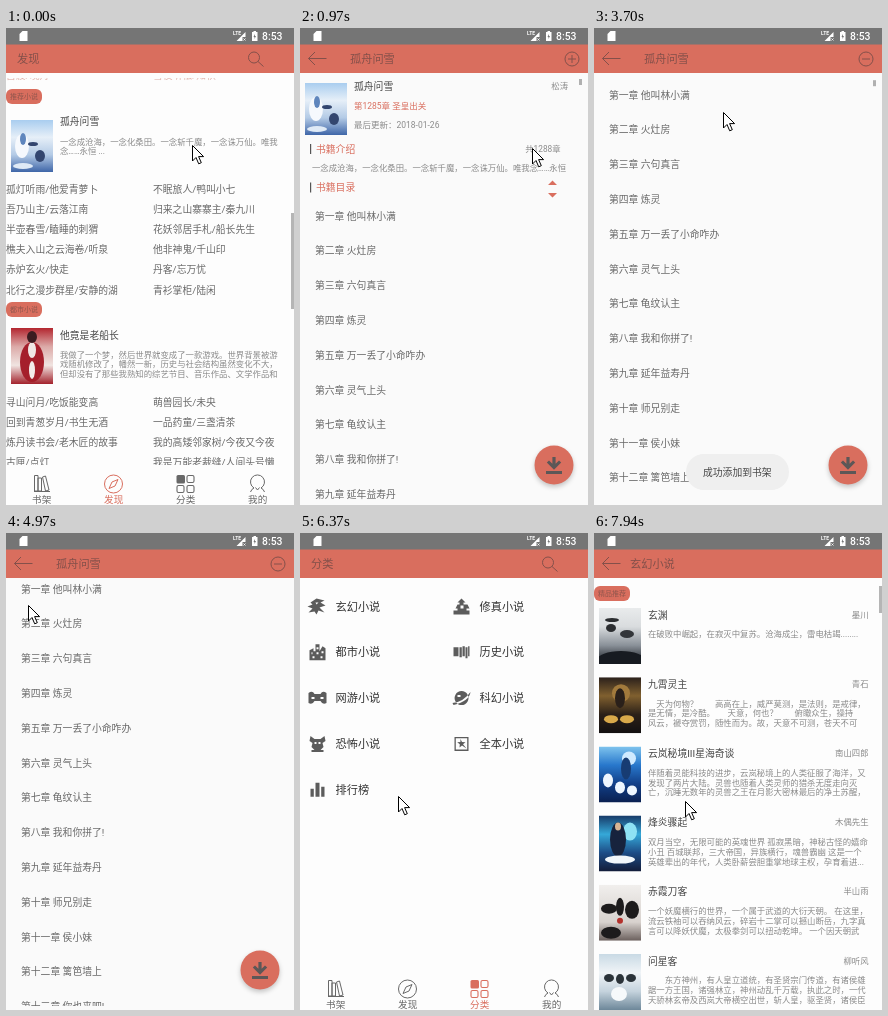
An HTML page with a canvas that plays this animation: 288x477 px, repeating every 8 s.

```html
<!DOCTYPE html>
<html lang="zh-CN">
<head>
<meta charset="utf-8">
<title>小说阅读器</title>
<style>
html, body { margin: 0; width: 100%; height: 100%; overflow: hidden; background: #fdfdfd; }
canvas { display: block; width: 288px; height: 477px; }
</style>
</head>
<body>
<canvas id="stage" width="288" height="477"></canvas>
<script>
const W = 288, H = 477, LOOP = 8000;
const RED = '#d96e5e', INK = '#686868', DARK = '#454545', PALE = '#8a8a8a', HEAD = '#84504a';
const FONT = 'Roboto, "Noto Sans CJK SC", "Noto Sans CJK", sans-serif';
const screen = document.getElementById('stage').getContext('2d');
const buffer = document.createElement('canvas');
buffer.width = W;
buffer.height = H;
const layerCtx = buffer.getContext('2d');
let g = screen;

const ticks = [
  [0, 0, 0], [430, 970, 4], [970, 1380, 3], [1500, 1500, 0], [1770, 2160, 3], [2160, 2590, 3],
  [3150, 3700, 4], [3700, 4150, 3], [4270, 4970, 5], [4970, 5240, 2], [5370, 5790, 3],
  [6220, 6370, 1], [6370, 6880, 4], [7160, 7310, 1], [7580, 7940, 3]
].flatMap(([a, b, n]) => Array.from({ length: n + 1 }, (_, i) => Math.floor(a + (n && (b - a) * i / n))));

const cursorPath = [
  [0, 186, 117], [700, 186, 117], [835, 207, 120], [970, 232, 120], [1107, 256, 85],
  [1243, 269, 42], [1380, 271, 27], [1500, 271, 25], [1770, 271, 25], [1900, 200, 36],
  [2160, 38, 66], [2303, 21, 95], [2590, 120, 230], [3150, 120, 230], [3562, 128, 105],
  [3700, 129, 84], [3850, 66, 44], [4150, 16, 26], [4690, 15, 26], [4970, 22, 72],
  [5240, 63, 319], [5510, 130, 415], [5790, 181, 455], [6220, 181, 455], [6370, 98, 263],
  [6625, 52, 110], [6880, 42, 74], [7580, 42, 74], [7940, 91, 268]
];
const scrollPath = [[3150, 0], [3425, 62], [3700, 121], [4150, 132]];

const clamp = v => Math.max(0, Math.min(1, v));
const between = (t, a, b) => t >= a && t < b;

function along(path, t) {
  const i = path.findIndex(k => k[0] > t);
  if (i === 0) return path[0].slice(1);
  if (i < 0) return path[path.length - 1].slice(1);
  const a = path[i - 1], b = path[i], p = (t - a[0]) / (b[0] - a[0]);
  return a.slice(1).map((v, n) => v + (b[n + 1] - v) * p);
}

function text(str, x, y, size = 9.8, color = INK, align = 'left', weight = 400) {
  g.font = `${weight} ${size}px ${FONT}`;
  g.fillStyle = color;
  g.textAlign = align;
  g.fillText(str, x, y + size * 0.37);
}
function rect(x, y, w, h, color, r = 0) {
  g.fillStyle = color;
  g.beginPath();
  g.roundRect(x, y, w, h, r);
  g.fill();
}
function disc(x, y, rx, ry, color) {
  g.fillStyle = color;
  g.beginPath();
  g.ellipse(x, y, rx, ry, 0, 0, 7);
  g.fill();
}
function shape(d, x, y, color, line = 0) {
  const path = new Path2D(d);
  g.save();
  g.translate(x, y);
  if (line) {
    g.strokeStyle = color;
    g.lineWidth = line;
    g.stroke(path);
  } else {
    g.fillStyle = color;
    g.fill(path, 'evenodd');
  }
  g.restore();
}
function clipped(y, h, draw) {
  g.save();
  g.beginPath();
  g.rect(0, y, W, h);
  g.clip();
  draw();
  g.restore();
}

// Covers: gradient colours, then soft blots [colour, x, y, rx, ry]
const covers = {
  sky: [['#a9cdef', '#e6eff8', '#b4cbe6', '#3f66a8'],
    ['#f6f9fd', 11, 26, 7, 12], ['#5f86bd', 12, 19, 3, 6], ['#33466f', 22, 24, 5, 2], ['#33466f', 29, 36, 5, 6], ['#dfeaf6', 12, 46, 10, 3]],
  coat: [['#b3262f', '#dcaaa8', '#f0e4e1', '#a3222c'],
    ['#a51f2b', 21, 34, 12, 20], ['#f0e7e4', 21, 22, 4, 8], ['#3b1c20', 21, 9, 5, 6], ['#f3ecea', 21, 42, 3, 9]],
  ink: [['#e9ebec', '#d9dcde', '#8a9199', '#12161c'],
    ['#2b2d30', 13, 12, 7, 2], ['#2b2d30', 12, 20, 5, 4], ['#33363a', 28, 26, 7, 4], ['#171b21', 22, 52, 24, 9]],
  gold: [['#2a201b', '#80602f', '#2b2018', '#121011'],
    ['#a27a3c', 22, 16, 9, 9], ['#2a201a', 21, 21, 5, 10], ['#d8a94a', 12, 42, 7, 4], ['#d8a94a', 28, 42, 7, 4]],
  blue: [['#7fc4ee', '#2878cc', '#123f88', '#0a2050'],
    ['#cfeaff', 30, 12, 7, 7], ['#173c73', 27, 22, 5, 11], ['#eef6ff', 9, 34, 5, 7], ['#eef6ff', 21, 41, 5, 6], ['#eef6ff', 33, 44, 5, 5]],
  cyan: [['#173a68', '#35a8d8', '#1d4c86', '#131c38'],
    ['#8ee2f4', 31, 16, 7, 9], ['#17233d', 19, 24, 8, 17], ['#d8b594', 19, 11, 3, 4], ['#f2f7fb', 21, 44, 15, 4]],
  brush: [['#f1efed', '#e4e0dd', '#d8d2ce', '#6a5f5c'],
    ['#1d1b1c', 10, 24, 8, 5], ['#1d1b1c', 21, 22, 4, 9], ['#1d1b1c', 33, 25, 7, 9], ['#1d1b1c', 12, 48, 10, 6], ['#b4312c', 21, 36, 3, 3]],
  mist: [['#c9dae5', '#f0f4f7', '#c5d3dd', '#6d8799'],
    ['#2b3339', 10, 24, 5, 4], ['#2b3339', 21, 25, 4, 5], ['#2b3339', 32, 24, 5, 4], ['#f6f9fb', 20, 40, 8, 7]]
};
function cover(name, y, h = 56) {
  const [tones, ...blots] = covers[name];
  const fill = g.createLinearGradient(0, 0, 0, h);
  tones.forEach((c, i) => fill.addColorStop(i / 3, c));
  g.save();
  g.translate(5, y);
  g.beginPath();
  g.rect(0, 0, 42, h);
  g.clip();
  rect(0, 0, 42, h, fill);
  blots.forEach(([c, x, by, rx, ry]) => disc(x, by, rx, ry, c));
  g.restore();
}

function bar(title, x) {
  rect(0, 16, W, 29, RED);
  text(title, x, 30.5, 11.2, HEAD);
}
function backArrow() {
  shape('M18.5 0H.5L7-6.5M.5 0L7 6.5', 8, 30.5, HEAD, 1);
}
function search() {
  shape('M5.5 0A5.5 5.5 0 1 1-5.5 0A5.5 5.5 0 1 1 5.5 0M4 4L9.5 9', 248, 29.5, HEAD, 1);
}
function tag(str, y) {
  rect(0, y, 36, 15, RED, 6);
  text(str, 4, y + 7.5, 7, '#8f554c');
}
function blurb(lines, y) {
  lines.forEach((s, i) => text(s, 54, y + i * 9.8, 8.4, PALE));
}

function statusBar() {
  rect(0, 0, W, 16.4, '#757575');
  shape('M3 0H8V10H0V3z', 13.5, 3, '#fff');
  text('LTE', 227, 5.5, 5, '#fff', 'left', 700);
  shape('M9 0V5H6V9H0zM7 6L9 9M9 6L7 9', 230.5, 4, '#fff');
  shape('M7 6.5L9 8.5M9 6.5L7 8.5', 230.5, 4, '#fff', 0.8);
  shape('M1.5 0H4V1H5.5V10H0V1H1.5zM3 3L1.5 6H2.5V8L4 5H3z', 246, 3, '#fff');
  text('8:53', 256, 8.2, 10.4, '#fff', 'left', 500);
}

function tabs(active) {
  const tone = i => i === active ? RED : INK;
  rect(0, 437, W, 40, '#fdfdfd');
  shape('M.5 .5H4V16H.5zM4 3H7.5V16H4zM8.5 2L11.5 1L15 15L11.5 16zM0 16.5H16', 28, 447, tone(0), 1);
  shape('M9 0A9 9 0 1 1-9 0A9 9 0 1 1 9 0M4.5-4.5L1.5 2L-4.5 4.5L-1.5-2z', 107.5, 456, tone(1), 1);
  rect(170.5, 447, 8.5, 8.5, tone(2), 1.5);
  g.strokeStyle = tone(2);
  g.lineWidth = 1.1;
  [[181, 447.5], [171, 457.5], [181, 457.5]].forEach(([x, y]) => {
    g.beginPath();
    g.roundRect(x, y, 7, 7, 1.5);
    g.stroke();
  });
  shape('M-3.5 6A7 7 0 1 1 3.5 6M-7 10Q-6 7-3.5 6M7 10Q6 7 3.5 6M-2 5.5L0 8L2 5.5', 251.5, 454, tone(3), 1);
  ['书架', '发现', '分类', '我的'].forEach((s, i) => text(s, 35.7 + i * 72, 471, 9.6, tone(i), 'center'));
}

const picks = [
  ['孤灯听雨/他爱青萝卜', '不眠旅人/鸭叫小七'],
  ['吾乃山主/云落江南', '归来之山寨寨主/秦九川'],
  ['半壶春雪/瞌睡的刺猬', '花妖邻居手札/船长先生'],
  ['樵夫入山之云海卷/听泉', '他非神鬼/千山印'],
  ['赤炉玄火/快走', '丹客/忘万忧'],
  ['北行之漫步群星/安静的湖', '青衫掌柜/陆闲']
];
const cityPicks = [
  ['寻山问月/吃饭能变高', '萌兽园长/未央'],
  ['回到青葱岁月/书生无酒', '一品药童/三盏清茶'],
  ['炼丹读书会/老木匠的故事', '我的高矮邻家树/今夜又今夜'],
  ['古匣/点灯', '我是万能老裁缝/人间头号懒']
];
const BOOK = '孤舟问雪';

function pairs(rows, y) {
  rows.forEach((row, i) => row.forEach((s, n) => text(s, n * 147, y + i * 20.2)));
}
function discover(t) {
  rect(0, 0, W, H, '#fdfdfd');
  clipped(50, 387, () => {
    text('古渡/晚舟', 0, 47.5, 9.8, '#e0b5ae');
    text('雪夜听松/知秋', 147, 47.5, 9.8, '#e0b5ae');
    tag('推荐小说', 61);
    g.globalAlpha = between(t, 430, 900) ? 0.4 : 1;
    cover('sky', 92, 52);
    text(BOOK, 54, 93.7, 9.8, DARK);
    blurb(['一念成沧海，一念化桑田。一念斩千魔，一念诛万仙。唯我', '念……永恒 ...'], 113.5);
    g.globalAlpha = 1;
    pairs(picks, 161);
    tag('都市小说', 274);
    cover('coat', 300);
    text('他竟是老船长', 54, 307, 9.8, DARK);
    blurb(['我做了一个梦，然后世界就变成了一款游戏。世界背景被游', '戏随机修改了，幡然一新，历史与社会结构虽然变化不大，', '但却没有了那些我熟知的综艺节目、音乐作品、文学作品和'], 326.5);
    pairs(cityPicks, 374);
    if (t < 900) rect(285, 185, 3, 96, '#b5b5b5');
  });
  bar('发现', 11);
  search();
  tabs(1);
}

const chapters = ['一章 他叫林小满', '二章 火灶房', '三章 六句真言', '四章 炼灵', '五章 万一丢了小命咋办',
  '六章 灵气上头', '七章 龟纹认主', '八章 我和你拼了!', '九章 延年益寿丹', '十章 师兄别走',
  '十一章 侯小妹', '十二章 篱笆墙上', '十三章 你也来吧!'];

function detail(t) {
  const [scroll] = along(scrollPath, t);
  rect(0, 0, W, H, '#fafafa');
  clipped(50, 423, () => {
    g.translate(0, -scroll);
    cover('sky', 55, 52);
    text(BOOK, 54, 58, 9.8, DARK);
    text('松涛', 268, 57.5, 8.4, PALE, 'right');
    text('第1285章 圣皇出关', 54, 77.5, 8.5, RED);
    text('最后更新：2018-01-26', 54, 96.5, 8.5, PALE);
    [['书籍介绍', 121], ['书籍目录', 159.5]].forEach(([s, y]) => {
      rect(10, y - 5, 1.2, 10, '#555');
      text(s, 16, y, 9.8, RED);
    });
    text('共1288章', 260.5, 120.5, 8.3, PALE, 'right');
    text('一念成沧海，一念化桑田。一念斩千魔，一念诛万仙。唯我念……永恒', 12, 139.5, 8.4, PALE);
    shape('M-4.5 0L0-4.5L4.5 0zM-4.5 8H4.5L0 12.5z', 252.5, 157, RED);
    chapters.forEach((s, i) => text('第' + s, 15, 188 + i * 34.8));
  });
  if (t < 4600) rect(279, 51 + scroll / 100, 3, 6, '#b0b0b0');
  bar(BOOK, 50);
  backArrow();
  const plus = t < 1770 ? 'M0-4V4' : '';
  shape('M7 0A7 7 0 1 1-7 0A7 7 0 1 1 7 0M-4 0H4' + plus, 272, 31, HEAD, 1);
  g.save();
  g.shadowColor = 'rgba(0,0,0,.22)';
  g.shadowBlur = 5;
  g.shadowOffsetY = 2.5;
  disc(254, 437, 19.5, 19.5, RED);
  g.restore();
  shape('M-1.6-8H1.6V-1.2L5-4.6L7.2-2.4L0 4.8L-7.2-2.4L-5-4.6L-1.6-1.2zM-8 6H8V9H-8z', 254, 437, '#5c5757');
  const show = Math.min(clamp((t - 1800) / 200), clamp((4450 - t) / 250));
  if (show > 0) {
    g.globalAlpha = show;
    rect(92, 426, 103, 36, '#efefef', 18);
    text('成功添加到书架', 109, 444, 9.8, DARK);
    g.globalAlpha = 1;
  }
}

const genres = [
  ['玄幻小说', 'M2 5L8 1l8 2-4 2 5 3-6 2 5 5-6-2-2 4-2-3-6 1 4-4-5-2 5-2zM7 5l3 0-2 2z'],
  ['修真小说', 'M9 1l4 4h-2v2h4l2 4h-3v2h3v4H1v-4h4v-2H3l2-4h2V5H5zM8 8v3h3V8z'],
  ['都市小说', 'M1 17V7l4-2v3h2V1h4v7l3-5 3 2v12zM3 9v2h1V9zM8 4v2h2V4zM8 9v2h2V9zM13 8v2h2V8zM4 13v2h2v-2zM12 13v2h2v-2z'],
  ['历史小说', 'M1 4h5v9H1zM7 4h2.3v10H7zM10 3h2.3v10H10zM13 4h2v11h-2zM15.6 3H17v10h-1.4z'],
  ['网游小说', 'M0 4q4-3 6 1h6q2-4 6-1v10q-4 2-6-2H6q-2 4-6 2zM3 8v2h3V8zM12 8v2h3V8z'],
  ['科幻小说', 'M9 2a7 7 0 1 0 .1 0zM0 14Q11 13 18 3Q17 12 1 16zM5 6v2h3V6z'],
  ['恐怖小说', 'M2 1l4 3h6l4-3 1 5-3 2 1 4-3 3h3v2H3v-2h3l-3-3 1-4-3-2zM6 7v2h2V7zM10 7v2h2V7z'],
  ['全本小说', 'M2 2h14v14H2zM3.3 3.3v11.4h11.4V3.3zM8 4l1.5 3 3.5.3-2.5 2 3.5 4.2-4.5-3-2.5 2 .3-3.2-2.6-2 3.2-.3z'],
  ['排行榜', 'M2 8h3.3v8H2zM7 2h4v14H7zM12.7 6H16v10h-3.3z']
];
function categories(t) {
  rect(0, 0, W, H, '#fdfdfd');
  bar('分类', 11);
  search();
  genres.forEach(([name, icon], i) => {
    const x = i % 2 * 144, y = 73.5 + Math.floor(i / 2) * 45.8;
    g.globalAlpha = i === 0 && between(t, 7160, 7310) ? 0.3 : 1;
    shape(icon, x + 8.5, y - 9, '#5c5c5c');
    text(name, x + 35.5, y, 11.2, '#333');
  });
  g.globalAlpha = 1;
  tabs(2);
}

const shelf = [
  ['ink', '玄渊', '墨川', '在破败中崛起，在寂灭中复苏。沧海成尘，雷电枯竭........'],
  ['gold', '九霄灵主', '青石', '　天为何物？　　高高在上，威严莫测，是法则，是戒律，', '是无情，是冷酷。　　天意，何也？　　俯瞰众生，操持', '风云，褫夺赏罚，随性而为。故，天意不可测，苍天不可'],
  ['blue', '云岚秘境III星海奇谈', '南山四郎', '伴随着灵能科技的进步，云岚秘境上的人类征服了海洋，又', '发现了两片大陆。灵兽也随着人类灵师的猎杀无度走向灭', '亡，沉睡无数年的灵兽之王在月影大密林最后的净土苏醒，'],
  ['cyan', '烽炎骤起', '木偶先生', '双月当空，无限可能的英魂世界 孤寂黑暗，神秘古怪的嬉命', '小丑 百城联邦，三大帝国，异族横行，魂兽霸幽 这是一个', '英雄辈出的年代，人类卧薪尝胆重掌地球主权，孕育着进...'],
  ['brush', '赤霞刀客', '半山雨', '一个妖魔横行的世界，一个属于武道的大衍天朝。 在这里，', '流云铁袖可以吞纳风云，碎岩十二掌可以撼山断岳，九字真', '言可以降妖伏魔，太极拳剑可以扭动乾坤。 一个因天朝武'],
  ['mist', '问星客', '柳听风', '　　东方神州，有人皇立道统，有圣贤宗门传道，有诸侯雄', '踞一方王国，诸强林立，神州动乱千万载，执此之时，一代', '天骄林玄帝及西岚大帝横空出世，斩人皇，驱圣贤，诸侯臣']
];
function genreList() {
  rect(0, 0, W, H, '#fdfdfd');
  bar('玄幻小说', 36);
  backArrow();
  tag('精品推荐', 53);
  shelf.forEach(([art, title, author, ...lines], i) => {
    const y = 75 + i * 69.2;
    cover(art, y);
    text(title, 54, y + 7, 9.8, DARK);
    text(author, 274.5, y + 6.5, 8.4, PALE, 'right');
    blurb(lines, y + 26.3);
  });
  rect(285, 53, 3, 27, '#b5b5b5');
}

// Pages enter by fading in while rising
function overlay(page, t, p) {
  if (p <= 0) return;
  g = layerCtx;
  g.clearRect(0, 0, W, H);
  page(t);
  g = screen;
  g.globalAlpha = p;
  g.drawImage(buffer, 0, (1 - p) * 40);
  g.globalAlpha = 1;
}

function render(t) {
  if (t < 6220) {
    discover(t);
    overlay(detail, t, t < 3000 ? clamp((t - 500) / 300) : clamp((5220 - t) / 230));
  } else {
    categories(t);
    overlay(genreList, t, clamp((t - 7490) / 300));
  }
  statusBar();
  const [x, y] = along(cursorPath, t);
  const arrow = 'M.5 .5V16L4 12.5L6.7 18.8L9.3 17.7L6.6 11.6H11.6z';
  shape(arrow, x, y, '#fff');
  shape(arrow, x, y, '#000', 1);
}

function frame() {
  const now = performance.now() % LOOP;
  render(ticks.filter(k => k <= now).pop());
  requestAnimationFrame(frame);
}
frame();
</script>
</body>
</html>
```
